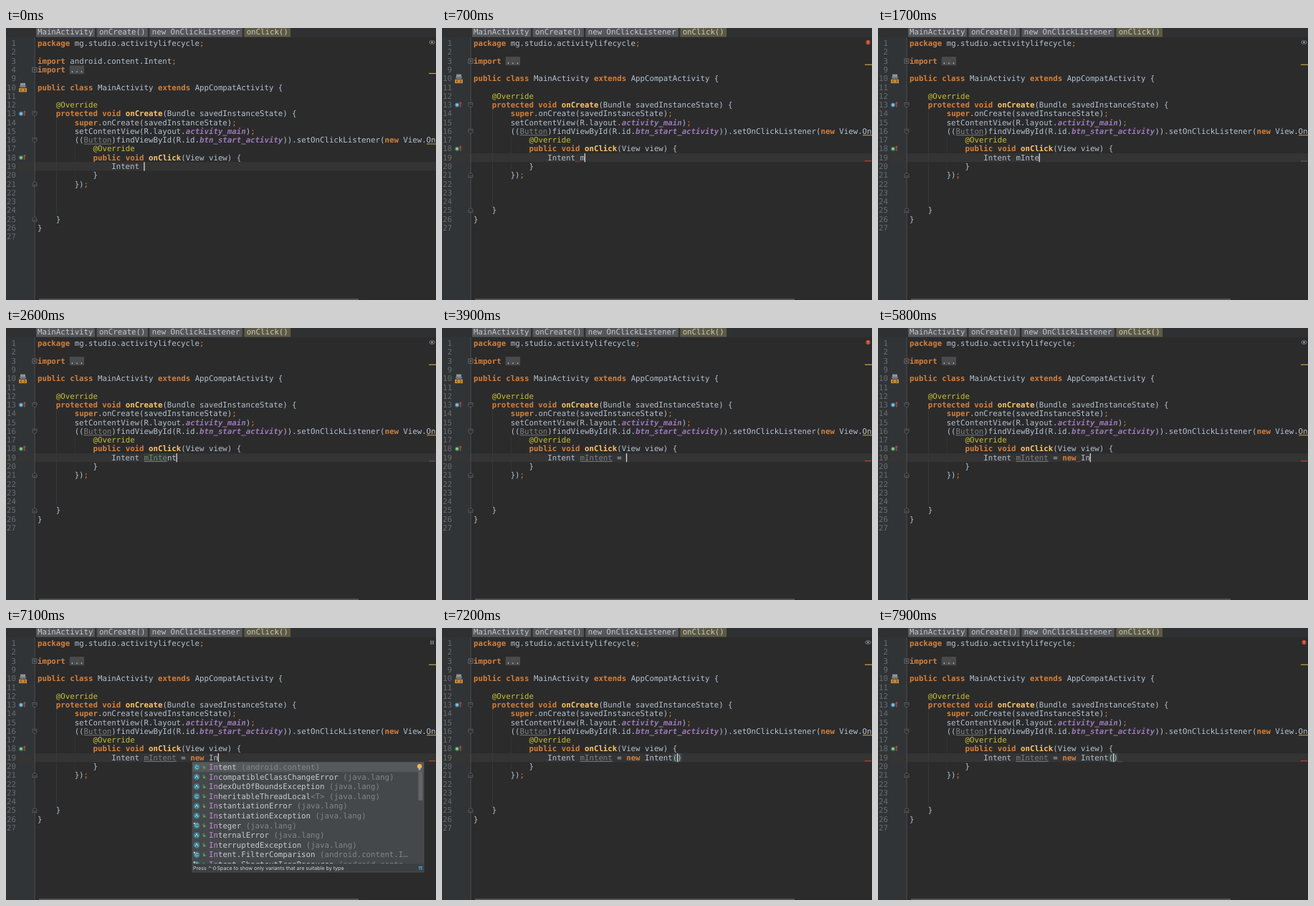
Recreate the animation shown at these times as an HTML page with a canvas. Size 600 by 380 pixels, loop 8 s.

```html
<!DOCTYPE html>
<html lang="en">
<head>
<meta charset="utf-8">
<style>
html, body { margin: 0; width: 100%; height: 100%; overflow: hidden; background: #2b2b2c; }
canvas { display: block; }
</style>
</head>
<body>
<canvas id="stage" width="600" height="380"></canvas>
<script>
const ctx = document.getElementById('stage').getContext('2d');
const LOOP = 8000, CHAR = 6.46, ROW = 12.27, LEFT = 44, TOP = 21.6;
const SIZE = CHAR / 0.602;
const MONO = '"DejaVu Sans Mono", monospace', SANS = 'Inter, sans-serif';

// Style letter -> [colour, font prefix, underlined]
const STYLES = {
  t: ['#b5c2cf', ''],
  k: ['#d5803a', 'bold'],
  s: ['#d5803a', ''],
  a: ['#c8c034', ''],
  m: ['#ffc66d', 'bold'],
  f: ['#9d78b5', 'italic bold'],
  u: ['#7c7f82', '', true],
  i: ['#c8cbcd', ''],
  p: ['#c58bd6', ''],
  g: ['#838688', '']
};

// Line number and its text; "~x" switches to style x
const HEAD = [[1, '~kpackage ~tmg.studio.activitylifecycle~s;'], [2, '']];
const OPEN = [[3, '~kimport ~tandroid.content.Intent~s;'], [4, '~kimport ~t...']];
const FOLDED = [[3, '~kimport ~t...']];
const BODY = [
  [9, ''],
  [10, '~kpublic class ~tMainActivity ~kextends ~tAppCompatActivity {'],
  [11, ''],
  [12, '~t    ~a@Override'],
  [13, '~t    ~kprotected void ~monCreate~t(Bundle savedInstanceState) {'],
  [14, '~t        ~ksuper~t.onCreate(savedInstanceState)~s;'],
  [15, '~t        setContentView(R.layout.~factivity_main~t)~s;'],
  [16, '~t        ((~uButton~t)findViewById(R.id.~fbtn_start_activity~t)).setOnClickListener(~knew ~tView.OnClickListener() {'],
  [17, '~t            ~a@Override'],
  [18, '~t            ~kpublic void ~monClick~t(View view) {'],
  [19, ''],
  [20, '~t            }'],
  [21, '~t        })~s;'],
  [22, ''], [23, ''], [24, ''],
  [25, '~t    }'],
  [26, '~t}'],
  [27, '']
];

const TYPED = [
  [0, ''], [700, 'm'], [1000, 'mI'], [1200, 'mIn'], [1400, 'mInt'], [1600, 'mInte'],
  [2400, 'mInten'], [2600, 'mIntent'], [3000, 'mIntent '], [3300, 'mIntent ='],
  [3600, 'mIntent = '], [4600, 'mIntent = n'], [4800, 'mIntent = ne'],
  [5000, 'mIntent = new'], [5300, 'mIntent = new '], [5500, 'mIntent = new I'],
  [5800, 'mIntent = new In'], [7200, 'mIntent = new Intent()']
];
const STATUS = [
  [0, 'eye'], [600, 'error'], [1000, 'eye'], [2000, 'error'], [2400, 'eye'],
  [3700, 'error'], [4600, 'eye'], [6000, 'pause'], [7200, 'eye'], [7600, 'error']
];
const FOLD_AT = 500, POPUP_FROM = 6000, POPUP_TO = 7200;

const CHOICES = [
  'tent~g (android.content)', 'compatibleClassChangeError~g (java.lang)',
  'dexOutOfBoundsException~g (java.lang)', 'heritableThreadLocal~g<T> (java.lang)',
  'stantiationError~g (java.lang)', 'stantiationException~g (java.lang)',
  'teger~g (java.lang)', 'ternalError~g (java.lang)',
  'terruptedException~g (java.lang)', 'tent.FilterComparison~g (android.content.I…',
  'tent.ShortcutIconResource~g (android.conte…'
];

const at = (steps, t) => steps.filter(s => s[0] <= t).pop()[1];
const colX = col => LEFT + col * CHAR;

function rect(x, y, w, h, colour) {
  ctx.fillStyle = colour;
  ctx.fillRect(x, y, w, h);
}

function disc(x, y, r, colour) {
  ctx.fillStyle = colour;
  ctx.beginPath();
  ctx.arc(x, y, r, 0, 7);
  ctx.fill();
}

function path(points, colour, width = 1) {
  ctx.strokeStyle = colour;
  ctx.lineWidth = width;
  ctx.beginPath();
  points.forEach(p => ctx.lineTo(...p));
  ctx.stroke();
}

function text(s, x, y, colour, prefix = '', size = SIZE, family = MONO) {
  ctx.font = `${prefix} ${size}px ${family}`;
  ctx.fillStyle = colour;
  ctx.fillText(s, x, y);
}

// Draws marked-up text; y is the centre of its row
function rich(markup, x, y) {
  for (const part of markup.split('~').slice(1)) {
    const [colour, prefix, line] = STYLES[part[0]], s = part.slice(1);
    text(s, x, y + 3.6, colour, prefix);
    if (line) rect(x, y + 5, s.length * CHAR, 0.9, colour);
    x += s.length * CHAR;
  }
}

function wave(x, y, w, colour) {
  const points = [];
  for (let i = 0; i <= w; i += 1.5) points.push([x + i, y + (i / 1.5 % 2)]);
  path(points, colour, 0.8);
}

function breadcrumbs() {
  rect(0, 0, 600, 13, '#2f3032');
  let x = 42;
  ['MainActivity', 'onCreate()', 'new OnClickListener', 'onClick()'].forEach((s, i) => {
    const w = s.length * CHAR + (i ? 6.6 : 4.5);
    rect(x, 0, w, 12.5, i < 3 ? '#55575a' : '#5d5a43');
    text(s, x + (i ? 3.3 : 2), 9.3, '#c3c8cc');
    x += w + 2.6;
  });
}

function foldBox(y) {
  rect(37, y - 3, 6, 6, '#2b2b2c');
  ctx.strokeStyle = '#777b7e';
  ctx.lineWidth = 0.8;
  ctx.strokeRect(37, y - 3, 6, 6);
  path([[38.5, y], [41.5, y]], '#8a8e90', 0.8);
  path([[40, y - 1.5], [40, y + 1.5]], '#8a8e90', 0.8);
}

function foldEdge(y, dir) {
  const shape = [[37, y - 3 * dir], [43, y - 3 * dir], [43, y + dir], [40, y + 3.5 * dir], [37, y + dir], [37, y - 3 * dir]];
  ctx.fillStyle = '#2b2b2c';
  ctx.beginPath();
  shape.forEach(p => ctx.lineTo(...p));
  ctx.fill();
  path(shape, '#66696b', 0.8);
  path([[38.5, y - dir], [41.5, y - dir]], '#66696b', 0.8);
}

function overrideIcon(y, colour) {
  disc(21, y, 2.9, colour);
  disc(21, y, 1.1, '#d5e2e6');
  path([[25.8, y + 3], [25.8, y - 3.5]], '#c9543f', 1.1);
  path([[24.4, y - 2], [25.8, y - 4], [27.2, y - 2]], '#c9543f', 0.9);
}

function classIcon(y) {
  rect(20, y - 6, 7, 6, '#8d969c');
  rect(19, y - 2.5, 9, 2, '#6d7880');
  rect(18, y + 1, 11, 5.5, '#c98a35');
  path([[22, y + 2], [20, y + 3.7], [22, y + 5.4]], '#3a2c18', 0.8);
  path([[25, y + 2], [27, y + 3.7], [25, y + 5.4]], '#3a2c18', 0.8);
}

function statusIcon(kind) {
  if (kind === 'error') {
    disc(594.5, 20, 3.2, '#b5452f');
    rect(594, 18, 1, 2.6, '#e4a090');
    rect(594, 21.3, 1, 0.9, '#e4a090');
  } else if (kind === 'pause') {
    rect(592.3, 17.5, 1.5, 5.5, '#8b8e90');
    rect(595.2, 17.5, 1.5, 5.5, '#8b8e90');
  } else {
    ctx.strokeStyle = '#85898b';
    ctx.lineWidth = 0.9;
    ctx.beginPath();
    ctx.ellipse(594.5, 20, 3.8, 2.3, 0, 0, 7);
    ctx.stroke();
    disc(594.5, 20, 1.3, '#9a9da0');
  }
}

function typingLine(t, y) {
  const typed = at(TYPED, t), base = 23, status = at(STATUS, t);
  const name = typed.slice(0, 7), rest = typed.slice(7);
  const known = t < 2000 ? 0 : t < 3000 ? 5 : 7;
  const closed = typed.endsWith(')');

  if (known === 5) rect(colX(base), y - 6, 5 * CHAR, 12, '#344134');
  if (closed) rect(colX(base + typed.length - 2), y - 6, 2 * CHAR, 12, '#3b4a46');
  rich('~t' + ' '.repeat(16) + 'Intent ' + '~u' + name.slice(0, known) + '~t' + name.slice(known) +
    '~t' + rest.replace('new', '~knew~t'), LEFT, y);

  if (t >= FOLD_AT && t < 1600) wave(colX(22), y + 5, CHAR, '#a84335');
  if (t >= 5500 && t < POPUP_FROM) wave(colX(base + 13), y + 5, CHAR, '#a84335');
  if (closed && t >= 7500) wave(colX(base + typed.length), y + 5, CHAR, '#a84335');

  const caret = colX(base + typed.length - closed);
  rect(caret - 0.3, y - 6, 1.3, 12.2, '#d5d8da');
  if (t >= FOLD_AT) {
    if (status === 'eye' && t < 3000) wave(590, y + 4.3, 9, '#77706a');
    else rect(590, y + 4, 9, 1.2, '#b04534');
  }
}

function popup() {
  const x = 260, y = 187.5, pitch = 13.6;
  rect(x, y, 323, 153.5, '#45484a');
  ctx.save();
  ctx.beginPath();
  ctx.rect(x, y, 323, 142);
  ctx.clip();
  rect(x, y, 323, pitch, '#55595b');
  CHOICES.forEach((s, i) => {
    const cy = 194.3 + i * pitch;
    disc(266, cy, 4.3, '#3e8294');
    if ([0, 3, 6, 9, 10].includes(i)) text('C', 264, cy + 2.4, '#c9dde2', '', 6.5, SANS);
    else path([[264, cy + 1.8], [266, cy - 2], [268, cy + 1.8]], '#c9dde2', 0.9);
    if (i === 6 || i > 8) disc(262.8, cy - 3, 1.2, i === 6 ? '#d6c3b5' : '#c8cdd0');
    rect(275, cy - 0.5, 3.2, 2.8, '#5c9a59');
    path([[275.2, cy], [275.2, cy - 2.2], [277, cy - 2.2]], '#5c9a59', 0.8);
    rich('~pIn~i' + s, colX(37), cy);
  });
  rect(575.5, 201, 6, 40, '#626669');
  disc(577, 193.2, 3.2, '#f0b552');
  rect(575.7, 196, 2.6, 2.5, '#b7b2a7');
  ctx.restore();
  rect(x, 329.5, 323, 11.5, '#3c3f41');
  text('Press ⌃⇧Space to show only variants that are suitable by type', 261, 337.7, '#d2d4d6', '', 7.1, SANS);
  text('π', 575.5, 338, '#4a9fe0', 'bold', 9, SANS);
  ctx.strokeStyle = '#55585a';
  ctx.lineWidth = 0.7;
  ctx.strokeRect(x, y, 323, 153.5);
}

function draw(t) {
  const lines = [...HEAD, ...(t < FOLD_AT ? OPEN : FOLDED), ...BODY];
  const rowY = {};
  lines.forEach(([n], i) => rowY[n] = TOP + i * ROW);
  const importY = rowY[9] - ROW;

  ctx.textBaseline = 'alphabetic';
  ctx.textRendering = 'geometricPrecision';
  rect(0, 0, 600, 380, '#2b2b2c');
  rect(0, 0, 40, 380, '#313437');
  rect(0, rowY[19] - 6.1, 600, ROW, '#343435');
  rect(39.7, 13, 0.8, 367, '#505355');
  rect(70, rowY[14] - 6, 0.8, rowY[25] - rowY[14], '#3a3a3b');
  rect(96, rowY[17] - 6, 0.8, 4 * ROW, '#353536');
  breadcrumbs();

  rect(colX(7) - 0.5, importY - 6, 3 * CHAR + 1, 12, '#484a4c');
  for (const [n, s] of lines) {
    text(n, 14 - String(n).length * CHAR, rowY[n] + 3.6, '#686c70');
    rich(s, LEFT, rowY[n]);
  }

  classIcon(rowY[10]);
  overrideIcon(rowY[13], '#4f94bd');
  overrideIcon(rowY[18], '#4c9a55');
  foldBox(importY);
  [13, 16].forEach(n => foldEdge(rowY[n], 1));
  [21, 25].forEach(n => foldEdge(rowY[n], -1));

  rect(590, importY + 4.5, 10, 1.2, '#c3a44a');
  rect(587, rowY[16] + 4.8, 13, 1.2, '#b9923f');
  statusIcon(at(STATUS, t));
  typingLine(t, rowY[19]);
  rect(46, 378, 446, 2, '#505254');
  if (t >= POPUP_FROM && t < POPUP_TO) popup();
}

const start = performance.now();
function tick() {
  draw((performance.now() - start) % LOOP);
  requestAnimationFrame(tick);
}
tick();
</script>
</body>
</html>
```
